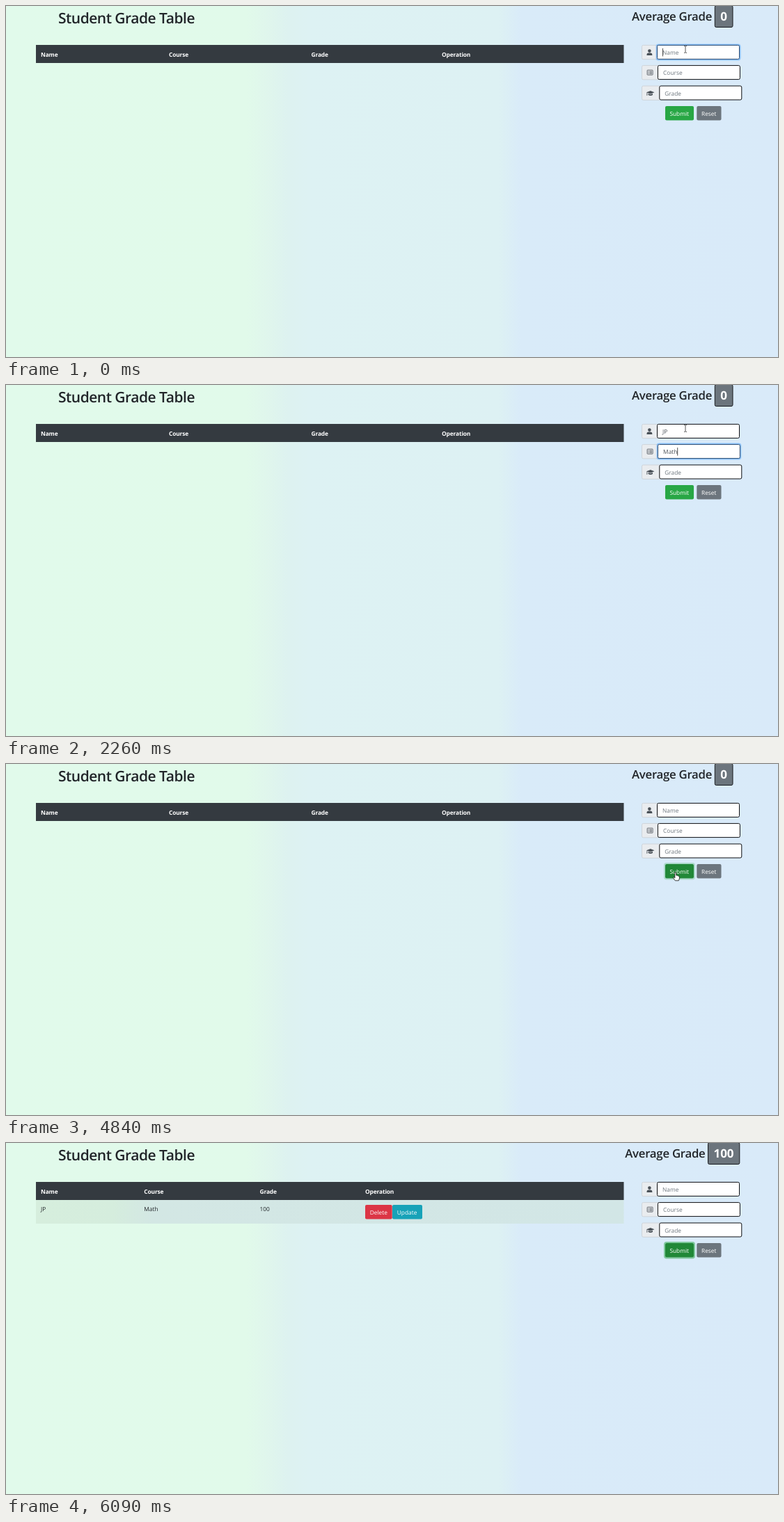
An HTML page that plays this animation: 1109 by 505 pixels, repeating every 6240 ms.

```html
<!DOCTYPE html>
<html lang="en">
<head>
<meta charset="utf-8">
<title>Student Grade Table</title>
<style>
  html, body { margin: 0; width: 100%; height: 100%; overflow: hidden; }
  svg { display: block; width: 100%; height: 100%; }
  text {
    font: 8.35px "Open Sans", "Noto Sans", sans-serif;
    text-rendering: geometricPrecision;
    fill: #212529;
    white-space: pre;
  }
  .title { font-size: 21px; font-weight: 600; letter-spacing: -.5px; }
  .average { font-size: 16.8px; font-weight: 600; letter-spacing: -.27px; }
  .score { font-size: 17px; font-weight: 700; fill: #fff; text-anchor: middle; }
  .head text { font-size: 8.4px; font-weight: 700; letter-spacing: -.14px; fill: #fff; }
  .btn text { fill: #fff; }
  .addon { fill: #e9ecef; stroke: #ced4da; }
  .box { fill: #fff; stroke: #0b0d10; }
  .focus .box { stroke: #26466c; }
  .ring { fill: none; stroke: #007bff; stroke-opacity: 0; stroke-width: 2; }
  .value { fill: #495057; }
  .empty .value { fill: #6c757d; }
  .caret { fill: #222; }
  .icon { fill: #495057; }
  #submit.hover .face { fill: #218838; }
  #submit .ring { stroke: #28a745; }
  .pointer { fill: #fff; stroke: #111; stroke-width: .8; stroke-linejoin: round; }
</style>
</head>
<body>
<svg viewBox="0 0 1109 505" preserveAspectRatio="none">
  <defs>
    <linearGradient id="sky" gradientUnits="userSpaceOnUse" x1="0" x2="1109" y1="0" y2="0">
      <stop offset="0" stop-color="#e1faeb"/>
      <stop offset=".312" stop-color="#e1faea"/>
      <stop offset=".345" stop-color="#dff5ed"/>
      <stop offset=".365" stop-color="#ddf2f0"/>
      <stop offset=".392" stop-color="#ddf2f3"/>
      <stop offset=".638" stop-color="#ddf1f3"/>
      <stop offset=".667" stop-color="#d9ebf9"/>
      <stop offset="1" stop-color="#d9eaf9"/>
    </linearGradient>
    <linearGradient id="stripe" gradientUnits="userSpaceOnUse" x1="43" x2="887" y1="0" y2="0">
      <stop offset="0" stop-color="#d6eedd"/>
      <stop offset=".13" stop-color="#d5eddd"/>
      <stop offset=".2" stop-color="#d3e7e4"/>
      <stop offset="1" stop-color="#d2e6e6"/>
    </linearGradient>
  </defs>

  <rect width="1109" height="505" fill="url(#sky)"/>
  <text class="title" x="75" y="25">Student Grade Table</text>

  <text class="average" id="average" y="21">Average Grade</text>
  <rect id="badge" y="-.5" height="31" rx="2" fill="#6c757d" stroke="#17191c"/>
  <text class="score" id="score" x="1031" y="21"></text>

  <g class="head" id="head">
    <rect x="43" y="56" width="844.5" height="26" fill="#343a40"/>
    <text y="72.7">Name</text>
    <text y="72.7">Course</text>
    <text y="72.7">Grade</text>
    <text y="72.7">Operation</text>
  </g>

  <g id="row">
    <rect x="43" y="82" width="844.5" height="34" fill="url(#stripe)"/>
    <text x="50" y="98">JP</text>
    <text x="198.3" y="98">Math</text>
    <text x="364.5" y="98">100</text>
    <g class="btn">
      <rect x="516" y="89" width="38.7" height="20.5" rx="2" fill="#dc3545"/>
      <text x="522.7" y="102.7">Delete</text>
      <rect x="555" y="89" width="43" height="20.5" rx="2" fill="#17a2b8"/>
      <text x="561.8" y="102.7">Update</text>
    </g>
  </g>

  <g id="fields"></g>

  <g class="icon">
    <circle cx="924.4" cy="64.6" r="2.3"/>
    <path d="M920.5 71V69.8Q920.5 67.4 923 67.4H925.8Q928.3 67.4 928.3 69.8V71Z"/>
    <path d="M920 124.3L925.8 122 931.5 124.3 925.8 126.6ZM922.6 126L925.8 127.3 929 126V128Q925.8 130 922.6 128ZM920.6 124.5H921.3V128.8H920.3Z"/>
  </g>
  <g fill="none" stroke="#495057" stroke-width=".8">
    <rect x="921.1" y="92.2" width="8" height="7" rx=".7"/>
    <path d="M922.3 94.2H923.5M924.3 94.2H928M922.3 95.8H923.5M924.3 95.8H928M922.3 97.4H923.5M924.3 97.4H928"/>
  </g>

  <g class="btn" id="submit">
    <rect class="ring" x="946" y="143" width="43" height="22.4" rx="3"/>
    <rect class="face" x="947" y="144" width="41" height="20.4" rx="2" fill="#28a745"/>
    <text x="953.4" y="157.7">Submit</text>
  </g>
  <g class="btn">
    <rect x="992.3" y="144" width="35.2" height="20.4" rx="2" fill="#6c757d"/>
    <text x="999" y="157.7">Reset</text>
  </g>

  <g id="beam" fill="none">
    <path d="M974 57.6H975.4L976 58.2 976.6 57.6H978M976 58V66.8M974 67.3H975.4L976 66.7 976.6 67.3H978" stroke="#444" stroke-width=".9"/>
  </g>
  <path id="arrow" class="pointer" d="M0 0V10.6L2.5 8.3 4.1 12 5.8 11.2 4.2 7.7H7.6Z"/>
  <path id="hand" class="pointer" d="M-1 1Q-1 0 0 0T1 1V4.4Q2.2 3.9 2.7 4.9 3.9 4.5 4.2 5.5 5.6 5.3 5.6 6.8V9.2L4.5 12H-.5L-3.2 8.4Q-3.7 7.2-2.6 7L-1 8.2Z"/>
</svg>

<script>
const LOOP = 6240;
const $ = id => document.getElementById(id);

// Each entry holds from its time until the next one.
const tracks = {
  name:   [[0, ""], [270, "J"], [850, "JP"], [4840, ""]],
  course: [[0, ""], [1980, "Ma"], [2260, "Math"], [4840, ""]],
  grade:  [[0, ""], [3230, "1"], [3350, "10"], [3630, "100"], [4840, ""]],
  focus:  [[0, "name"], [1290, "course"], [2410, "grade"], [4840, "submit"]],
  glow:   [[0, 1], [1290, .25], [1410, 1], [2410, .3], [2560, 1], [4840, .5], [4960, 1]],
  caret:  [[0, 1], [150, 0], [270, 1], [1840, 0], [1980, 1], [2960, 0],
           [3230, 1], [4060, 0], [4590, 1], [4840, 0]],
  hover:  [[0, false], [4470, true]],
  saved:  [[0, false], [4960, true]],
  mouse:  [[0, ["beam", 0, 0]], [4330, ["arrow", 957.5, 135.5]], [4470, ["hand", 961.8, 155.8]],
           [5390, ["hand", 962.6, 158]], [5540, ["arrow", 1063, 388.5]],
           [5670, ["arrow", 1081.5, 430]], [5820, ["arrow", 1095, 465]],
           [5970, ["arrow", 1098, 492.5]], [6090, ["none", 0, 0]]]
};
const at = (track, t) => tracks[track].findLast(([start]) => start <= t)[1];

function makeField(key, label, x, y, textX) {
  const g = document.createElementNS("http://www.w3.org/2000/svg", "g");
  g.innerHTML = `
    <rect class="addon" x="913.5" y="${y}" width="${x - 911.5}" height="20.3" rx="2"/>
    <rect class="ring" x="${x - 1}" y="${y - 1}" width="120" height="22" rx="3"/>
    <rect class="box" x="${x}" y="${y}" width="118" height="20" rx="2"/>
    <text class="value" x="${textX}" y="${y + 13.5}"></text>
    <rect class="caret" y="${y + 4.5}" width=".8" height="11.5"/>`;
  $("fields").append(g);
  const [value, ring, caret] = ["value", "ring", "caret"].map(c => g.querySelector("." + c));
  return { key, label, textX, g, value, ring, caret };
}

const fields = [
  makeField("name", "Name", 935.5, 56.4, 943),
  makeField("course", "Course", 936.4, 85.6, 944.1),
  makeField("grade", "Grade", 938.8, 115, 946.3)
];
const submitRing = $("submit").querySelector(".ring");
const headings = $("head").querySelectorAll("text");

function show(el, on) { el.style.display = on ? "" : "none"; }

function drawField(f, t, focus, glow) {
  const typed = at(f.key, t);
  const active = focus === f.key;
  f.g.setAttribute("class", (active ? "focus " : "") + (typed ? "" : "empty"));
  f.value.textContent = typed || f.label;
  f.ring.style.strokeOpacity = active ? .35 * glow : 0;
  show(f.caret, active && at("caret", t));
  f.caret.setAttribute("x", f.textX + (typed ? f.value.getComputedTextLength() : 0));
}

function draw(t) {
  const focus = at("focus", t), glow = at("glow", t);
  fields.forEach(f => drawField(f, t, focus, glow));

  $("submit").classList.toggle("hover", at("hover", t));
  submitRing.style.strokeOpacity = focus === "submit" ? .5 * glow : 0;

  const saved = at("saved", t);
  show($("row"), saved);
  const columns = saved ? [50, 198.3, 364.5, 516] : [50, 234, 438.5, 626];
  headings.forEach((h, i) => h.setAttribute("x", columns[i]));
  $("average").setAttribute("x", saved ? 889.3 : 899);
  $("badge").setAttribute("x", saved ? 1008.5 : 1018.3);
  $("badge").setAttribute("width", saved ? 45.3 : 25.7);
  $("score").textContent = saved ? "100" : "0";

  const [kind, x, y] = at("mouse", t);
  for (const id of ["beam", "arrow", "hand"]) {
    show($(id), id === kind);
    $(id).setAttribute("transform", `translate(${x} ${y})`);
  }
}

const start = performance.now();
function tick() {
  draw((performance.now() - start) % LOOP);
  requestAnimationFrame(tick);
}
tick();
</script>
</body>
</html>
```
